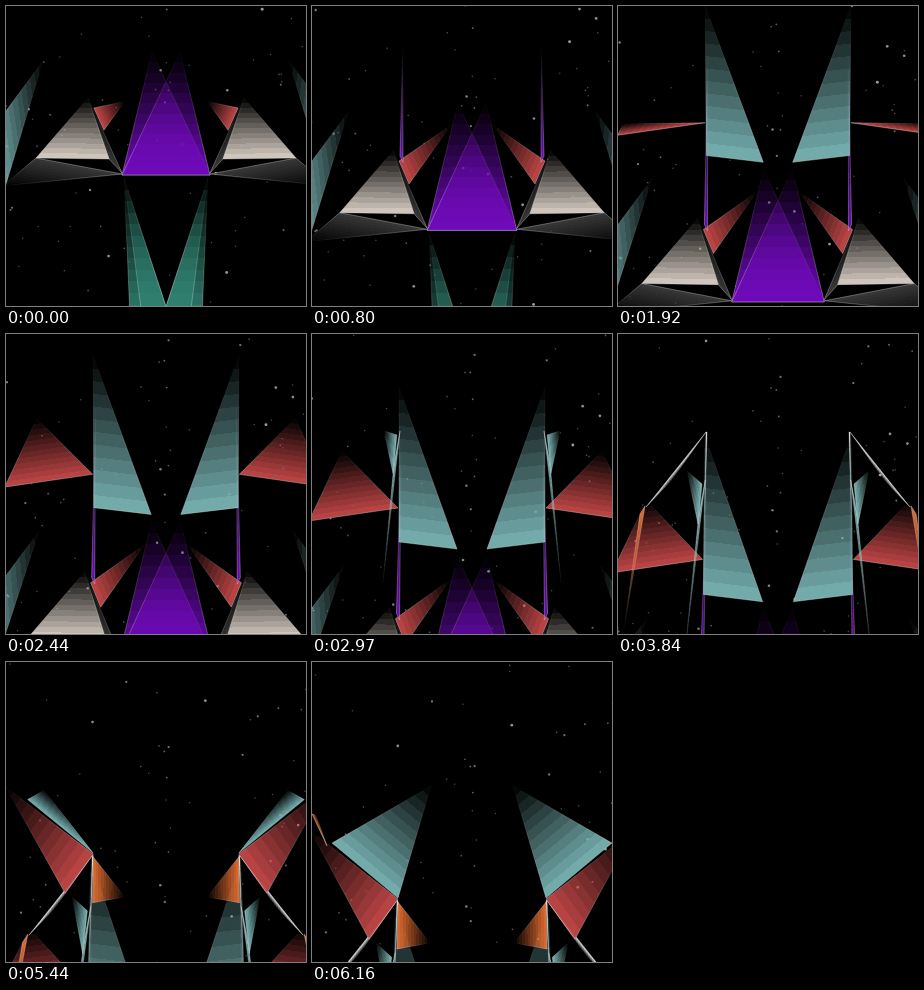
These frames come from a looping animation (300 px wide and 300 px high, 6220 ms). An HTML page with a canvas:

```html
<!DOCTYPE html>
<html lang="en">
<head>
<meta charset="utf-8">
<title>Folding towers</title>
<style>
  html, body { margin: 0; width: 100%; height: 100%; overflow: hidden; background: #000; }
  canvas { display: block; width: 300px; height: 300px; }
</style>
</head>
<body>
<canvas id="stage" width="300" height="300"></canvas>
<script>
const ctx = document.getElementById('stage').getContext('2d');
const LOOP = 6220, STEP = 87.2, LAST = 70;
const AXIS = 160, DEPTH = 0.0007, BANDS = 12;
const INTERVAL = 8, GROWTH = 12;

const PURPLE = '110,10,184', TEAL = '120,178,178', GREEN = '48,128,112', RED = '192,70,70',
      IVORY = '216,206,196', SMOKE = '56,56,56', ORANGE = '222,106,46', WHITE = '235,235,235';

const clamp = v => Math.max(0, Math.min(1, v));
const mix = (p, q, k) => p.map((v, i) => v + (q[i] - v) * k);

// Steady descent with a damped sway.
const scroll = step => 4.74 * step + 10.5 * Math.sin(step / 10.8) * Math.exp(-step / 34);

// The view widens and speeds up towards the bottom.
const widen = y => 1 + 0.9 * (y / 1000) ** 2;
const toWorld = ([x, y], cam) => [(x - AXIS) / widen(y), Math.log(1 + DEPTH * y) / DEPTH - cam];
function toScreen([x, y], cam) {
  const sy = (Math.exp(DEPTH * (y + cam)) - 1) / DEPTH;
  return [x * widen(sy), sy];
}

// A facet fades from its tip to the edge hinge-end. Points are given as seen at a step.
const facet = (color, generation, seen, ...points) => ({
  color,
  birth: INTERVAL * generation - 9,
  points: points.map(p => toWorld(p, scroll(seen)))
});

const facets = [
  facet(GREEN, -2, 0, [118, 172], [124, 310], [163, 310]),
  facet(GREEN, -2, 0, [118, 172], [136, 310], [163, 310]),
  facet(TEAL, -2, 0, [37, 55], [-15, 125], [-5, 195]),
  facet(SMOKE, -2, 0, [-3, 180], [30, 152], [116, 168]),
  facet(SMOKE, -2, 0, [82, 92], [103, 153], [116, 167]),
  facet(IVORY, -2, 0, [82, 92], [30, 152], [103, 153]),
  facet(PURPLE, -2, 0, [146, 46], [116, 169], [204, 169]),
  facet(RED, 0, 9, [139, 119], [87, 155], [97, 178]),
  facet(PURPLE, 1, 9, [90, -10], [88, 150], [91, 156]),
  facet(TEAL, 2, 34, [87, 53], [87, 208], [145, 215]),
  facet(RED, 3, 34, [30, 117], [86, 174], [-3, 187]),
  facet(TEAL, 4, 34, [68, 278], [88, 97], [82, 130]),
  facet(TEAL, 4, 44, [69, 137], [84, 150], [80, 190]),
  facet(ORANGE, 5, 44, [6, 295], [27, 172], [22, 180]),
  facet(WHITE, 5, 44, [86, 215], [88, 98], [89, 98]),
  facet(WHITE, 5, 44, [54, 146], [88, 98], [28, 173]),
  facet(ORANGE, 6, 70, [118, 281], [86, 240], [85, 287]),
  facet(RED, 7, 70, [-2, 168], [86, 237], [57, 277]),
  facet(TEAL, 8, 70, [119, 124], [86, 236], [20, 181]),
  facet(ORANGE, 9, 70, [24, 156], [15, 184], [0, 152])
];

// Stars fill everything that will scroll into view; near ones are faster and brighter.
let seed = 11;
const random = () => (seed = seed * 16807 % 2147483647) / 2147483647;
const stars = Array.from({ length: 100 }, () => {
  const near = random() ** 3, travel = 92 + 130 * near;
  return { near, travel, x: random() * 320 - AXIS, y: random() * (300 + travel) - travel };
});

function drawStars(progress) {
  for (const { near, travel, x, y } of stars) {
    ctx.fillStyle = `rgba(205,205,205,${0.35 + 0.4 * near})`;
    ctx.beginPath();
    ctx.arc(x * (1 + progress * (0.02 + 0.08 * near)), y + travel * progress, 0.75 + 0.7 * near, 0, 7);
    ctx.fill();
  }
}

// Banded ramp, perpendicular to the hinge edge.
function ramp(color, [ax, ay], [bx, by], [cx, cy]) {
  const ex = cx - bx, ey = cy - by;
  const k = ((ax - bx) * ex + (ay - by) * ey) / (ex * ex + ey * ey || 1);
  const gradient = ctx.createLinearGradient(ax, ay, bx + ex * k, by + ey * k);
  for (let i = 0; i < BANDS; i++) {
    const paint = `rgba(${color},${(i + 0.5) / BANDS})`;
    gradient.addColorStop(i / BANDS, paint);
    gradient.addColorStop((i + 1) / BANDS, paint);
  }
  return gradient;
}

// The edge draws out from the hinge, then the tip opens from the end of the edge.
function drawFacet({ color, birth, points: [tip, hinge, end] }, step, cam) {
  const age = 2 * (step - birth) / GROWTH;
  if (age <= 0) return;
  const far = mix(hinge, end, clamp(age));
  const corners = [mix(far, tip, clamp(age - 1)), hinge, far].map(p => toScreen(p, cam));
  ctx.beginPath();
  for (const [x, y] of corners) ctx.lineTo(x, y);
  ctx.closePath();
  ctx.fillStyle = ramp(color, ...corners);
  ctx.fill();
  ctx.globalAlpha = 0.5;
  ctx.strokeStyle = ramp(WHITE, ...corners);
  ctx.stroke();
  ctx.globalAlpha = 1;
}

function draw(now) {
  const step = Math.min(LAST, Math.floor(now % LOOP / STEP));
  const cam = scroll(step);
  ctx.setTransform(1, 0, 0, 1, AXIS, 0);
  ctx.fillStyle = '#000';
  ctx.fillRect(-AXIS, 0, 300, 300);
  drawStars(cam / scroll(LAST));
  ctx.lineWidth = 0.7;
  ctx.lineJoin = 'bevel';
  for (const shape of facets) {
    for (const side of [1, -1]) {
      ctx.setTransform(side, 0, 0, 1, AXIS, 0);
      drawFacet(shape, step, cam);
    }
  }
}

const start = performance.now();
function tick() {
  draw(performance.now() - start);
  requestAnimationFrame(tick);
}
tick();
</script>
</body>
</html>
```
